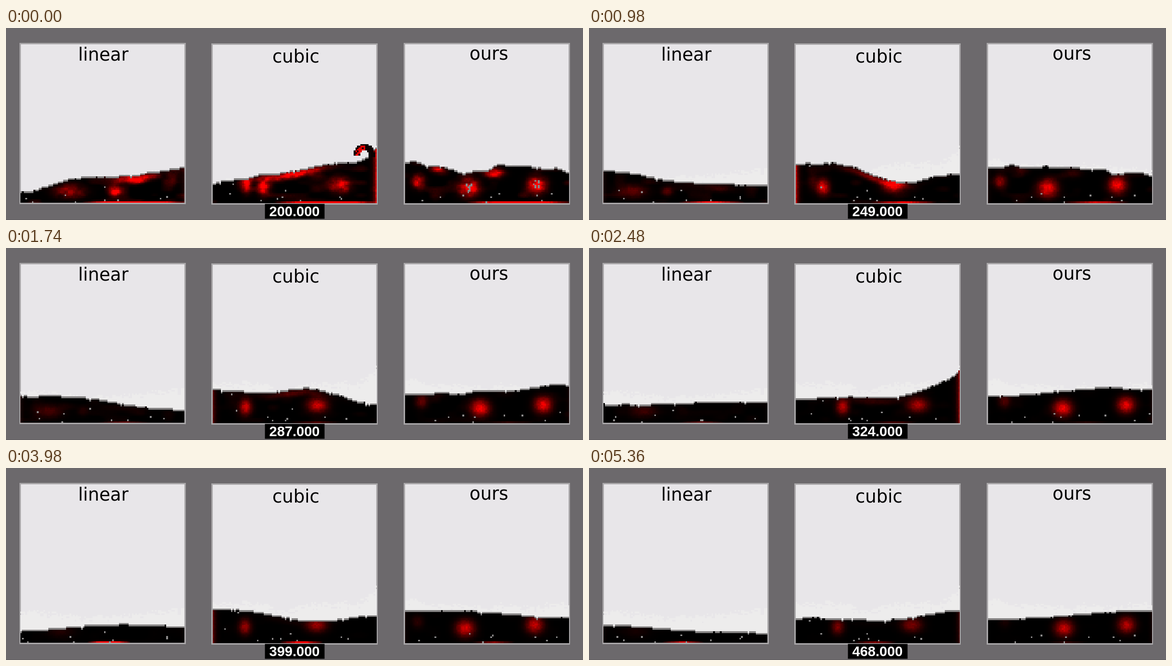
These frames come from a looping animation (1200 px wide and 400 px high, 5380 ms). An HTML page with a canvas:

```html
<!DOCTYPE html>
<html lang="en">
<head>
<meta charset="utf-8">
<title>Fluid interpolation comparison</title>
<style>
html, body { margin: 0; width: 100%; height: 100%; overflow: hidden; background: #6c696c; }
svg, canvas { position: absolute; left: 0; top: 0; width: 1200px; height: 400px; display: block; }
.box { fill: #e8e6e9; stroke: #a9a7a9; stroke-width: 3; }
.label { font: 37px "DejaVu Sans", sans-serif; }
#count { font: bold 29px "Liberation Sans", Arial, sans-serif; fill: #fff; text-anchor: middle; }
</style>
</head>
<body>
<svg viewBox="0 0 1200 400">
  <rect y="399" width="1200" height="1" fill="#5f5c5f"/>
  <rect class="box" x="29.5" y="32.5" width="343" height="333"/>
  <rect class="box" x="428.5" y="33.5" width="343" height="333"/>
  <rect class="box" x="828.5" y="32.5" width="343" height="334"/>
  <text class="label" x="150" y="68">linear</text>
  <text class="label" x="554" y="72">cubic</text>
  <text class="label" x="964" y="66">ours</text>
  <rect x="538.5" y="366.5" width="124" height="31"/>
  <text id="count" x="600" y="392">200.000</text>
</svg>
<canvas id="stage" width="1200" height="400"></canvas>
<script>
const STEP = 20, STEPS = 269;
const COLS = 100, ROWS = 40, CELL = 3.41, WIDTH = COLS * CELL;

// Sloshing water as standing waves; times in seconds, lengths in pixels.
// level: mean height and its drop per second
// modes: [amplitude, period, peak time, decay time] of the 1st, 2nd, 3rd wave
// swirls: [x, y, rx, ry, power, decay time], carried along by the first wave
// sheet: red layer under the surface, [x, half width, depth, power, decay time]
const tanks = [
  {
    x: 30, bottom: 364, seed: 11, level: [311, 4.6], rough: 4, crest: 0, wall: .01, floorLife: 50,
    modes: [[24, 3.7, -.4, 5], [4, 2, 4, 50], [6, 1.5, 0, 1.5]],
    swirls: [[108, 340, 28, 13, .45, 3], [190, 340, 11, 9, 1.1, .8], [335, 310, 14, 16, .2, 1]],
    sheet: [268, 36, 11, .95, .5]
  },
  {
    x: 430, bottom: 364.5, seed: 47, level: [297, 2.4], rough: 8, crest: 40, wall: .06, floorLife: 8,
    modes: [[24, 3.05, -.3, 5.5], [8, 1.5, 3.25, 50], [10, 1.4, 1.05, 4]],
    swirls: [[510, 331, 12, 15, 1, 7], [662, 327, 20, 14, .9, 8], [482, 322, 10, 17, .9, .6]],
    sheet: [595, 62, 9, .95, 1.4]
  },
  {
    x: 830, bottom: 364.5, seed: 83, level: [291, 2.6], rough: 15, crest: 0, wall: .01, floorLife: 3, foam: true,
    modes: [[12, 3, 2.1, 50], [3, 1.6, 2.6, 50], [7, 1.3, .65, 1.5]],
    swirls: [[970, 334, 18, 16, 1.05, 16], [1108, 327, 17, 16, 1.05, 12], [860, 320, 12, 13, .75, 2.5], [1022, 302, 17, 9, .9, .6]],
    sheet: [900, 14, 8, .6, .8]
  }
];

const ctx = document.getElementById('stage').getContext('2d');
const count = document.getElementById('count');
const grid = document.createElement('canvas');
grid.width = COLS;
grid.height = ROWS;
const gctx = grid.getContext('2d');

const mix = (a, b, u) => a + (b - a) * u;
const fade = (t, life) => Math.exp(-t / life);
const bell = v => Math.exp(-v * v);

function hash(a, b, c = 0) {
  const s = Math.sin(a * 127.1 + b * 311.7 + c * 74.7) * 43758.5453;
  return s - Math.floor(s);
}

function noise(x, y, seed) {
  const i = Math.floor(x), j = Math.floor(y);
  const soft = v => v * v * (3 - 2 * v);
  const u = soft(x - i), v = soft(y - j);
  return mix(mix(hash(i, j, seed), hash(i + 1, j, seed), u),
             mix(hash(i, j + 1, seed), hash(i + 1, j + 1, seed), u), v);
}

const wave = ([amp, period, peak, life], t) =>
  amp * fade(t, life) * Math.cos(2 * Math.PI * (t - peak) / period);

// Run-up against the right wall each time the swell returns.
function runUp(tank, t) {
  const gap = t - 2.45 * Math.round(t / 2.45);
  return tank.crest * fade(t, 5) * bell(gap / .22);
}

function surface(tank, u, t) {
  let y = tank.level[0] + tank.level[1] * t;
  tank.modes.forEach((m, n) => y += wave(m, t) * Math.cos((n + 1) * Math.PI * u));
  y -= runUp(tank, t) * Math.exp((u - 1) * 17);
  return y + tank.rough * fade(t, 2) * (noise(u * 14, t * 3, tank.seed) - .5);
}

// Highest level reached so far in each column, for the residue left above the water.
for (const tank of tanks) {
  tank.reach = [];
  for (let n = 0; n < STEPS; n++)
    tank.reach.push(Array.from({ length: COLS }, (_, c) => Math.min(
      surface(tank, (c + .5) / COLS, n * STEP / 1000), n ? tank.reach[n - 1][c] : 400)));
}

function swirlsAt(tank, t) {
  const push = 2 * wave(tank.modes[0], t);
  return tank.swirls.map(([x, y, rx, ry, power, life]) => ({
    x: x + push * Math.sin(Math.PI * (x - tank.x) / WIDTH), y, rx, ry, power: power * fade(t, life)
  }));
}

function drawTank(tank, n) {
  const t = n * STEP / 1000, { seed } = tank;
  const img = gctx.createImageData(COLS, ROWS);
  const put = (c, r, red, rest = 0) => {
    if (c >= 0 && c < COLS && r >= 0 && r < ROWS)
      img.data.set([red, rest, rest, 255], ((ROWS - 1 - r) * COLS + c) * 4);
  };
  const colAt = x => Math.floor((x - tank.x) / CELL);
  const rowAt = y => Math.floor((tank.bottom - y) / CELL);

  const swirls = swirlsAt(tank, t);
  const [sx, sw, depth, sp, sl] = tank.sheet;
  const tilt = wave(tank.modes[0], t);
  const floorGlow = (.55 + .45 * Math.cos(2 * Math.PI * t / 4.2)) * fade(t, tank.floorLife);
  const floorMid = .7 - .04 * t, floorHalf = .13 + .2 * fade(t, 1);
  const tops = [];

  for (let c = 0; c < COLS; c++) {
    const u = (c + .5) / COLS, x = tank.x + u * WIDTH;
    const level = surface(tank, u, t);
    const bump = hash(c, Math.floor(t * 6), seed);
    const top = Math.round((tank.bottom - level) / CELL) - (bump < .03);
    tops.push(top);

    const high = rowAt(tank.reach[n][c]) + hash(c, 3, seed) * 2 - 1;
    for (let r = top; r < high; r++)
      if (hash(c >> 1, r, seed) < .5 + (high - r) * .12) put(c, r, 237, 236);

    const side = tilt > 0 ? 1 - u : u;
    for (let r = 0; r < top; r++) {
      const y = tank.bottom - (r + .5) * CELL;
      let g = sp * fade(t, sl) * bell((x - sx) / sw) * bell((y - level - depth) / 7);
      for (const s of swirls) g += s.power * bell(Math.hypot((x - s.x) / s.rx, (y - s.y) / s.ry));
      g *= 1 + fade(t, .8) * (noise(c / 3, r / 2, seed) - .4);
      g += fade(t, 1.5) * Math.max(0, noise(c / 9, r / 4 + t, seed) - .6) * .5;
      g += tank.wall * Math.abs(tilt) * Math.exp(-side * 90);
      if (r === 0) g += 2 * floorGlow * Math.max(0, 1 - Math.abs(u - floorMid) / floorHalf);
      g *= .88 + .24 * hash(c, r, seed);
      if (r === top - 1 && bump < .95) put(c, r, 132, 130);
      else put(c, r, Math.min(255, g * 255));
    }
  }

  // drifting grey markers
  for (let j = 0; j < 9; j++) {
    const c = Math.floor(hash(j, 5, seed) * COLS + 5 * Math.sin(t * 1.4 + j * 2) + COLS) % COLS;
    const d = hash(j, 9, seed);
    put(c, Math.floor(d * (j % 2 ? 4 : tops[c] - 2)), 140, 138);
  }

  // foam caught in the two main swirls at the start
  if (tank.foam)
    for (const s of swirls.slice(0, 2))
      for (let j = 0; j < 12 * (1 - t / .5); j++)
        put(colAt(s.x + (hash(j, 1, s.rx) - .5) * 16), rowAt(s.y + (hash(j, 2, s.rx) - .5) * 18), 136, 134);

  // a tall run-up curls over to the left
  const rise = runUp(tank, t);
  if (rise > 26) {
    const cx = tank.x + WIDTH - 26, cy = 304 - rise;
    for (let a = .2; a > -3.1; a -= .05)
      for (let m = 0; m < 4; m++) {
        const rad = 20 - m * 3, x = cx + Math.cos(a) * rad, y = cy + Math.sin(a) * rad;
        put(colAt(x), rowAt(y), a < -1.6 && m && hash(colAt(x), rowAt(y), seed) < .6 ? 225 : 12);
      }
  }

  gctx.putImageData(img, 0, 0);
  ctx.drawImage(grid, tank.x, tank.bottom - ROWS * CELL, WIDTH, ROWS * CELL);
}

function frame() {
  const n = Math.floor(performance.now() / STEP) % STEPS;
  ctx.clearRect(0, 0, 1200, 400);
  ctx.imageSmoothingEnabled = false;
  for (const tank of tanks) drawTank(tank, n);
  count.textContent = (200 + n).toFixed(3);
  requestAnimationFrame(frame);
}
frame();
</script>
</body>
</html>
```
